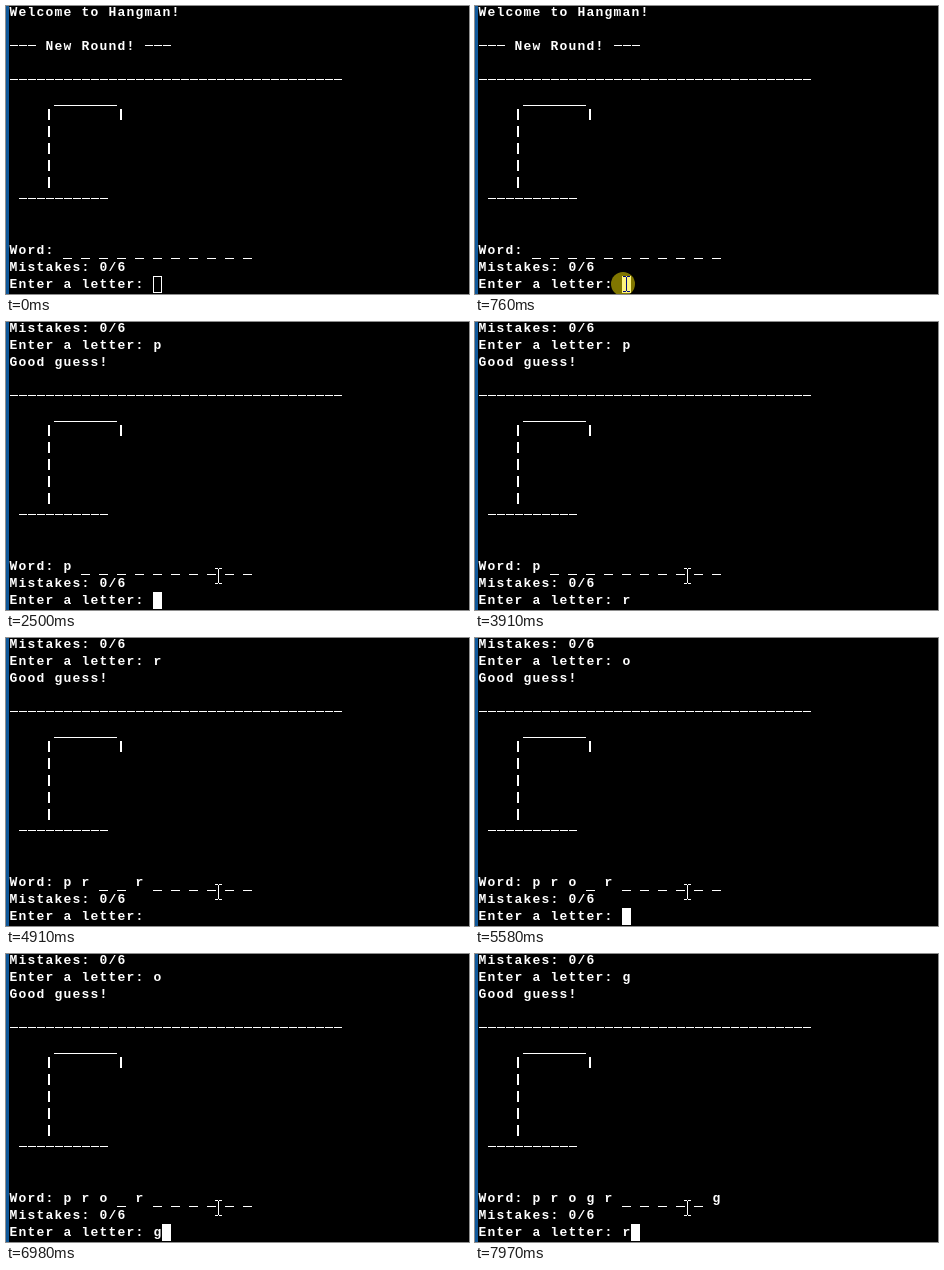
An HTML page that plays this animation: 463 px wide and 288 px high, repeating every 8000 ms.

```html
<!DOCTYPE html>
<html lang="en">
<head>
<meta charset="utf-8">
<title>Hangman</title>
<style>
  html, body { margin: 0; width: 100%; height: 100%; overflow: hidden; background: #000; }
  svg { display: block; width: 463px; height: 288px; isolation: isolate; }
  text { font: bold 13px "Liberation Mono", "DejaVu Sans Mono", monospace; letter-spacing: 1.2px; fill: #fff; }
  #pointer { mix-blend-mode: difference; }
</style>
</head>
<body>
<svg viewBox="0 0 463 288">
  <rect width="463" height="288" fill="#000"/>
  <rect width="3" height="288" fill="#10589a"/>
  <g id="screen" fill="#fff" shape-rendering="crispEdges"></g>
  <rect id="caret" y="270" width="9" height="17" fill="#fff"/>
  <rect id="hollow" x="147.5" y="270.5" width="8" height="16" fill="none" stroke="#fff"/>
  <circle id="click" cx="148" cy="278" r="12" fill="#ffeb00" opacity=".5"/>
  <path id="pointer" fill="#fff" shape-rendering="crispEdges"
    d="M-3-8h3v1h1v-1h3v1h-3v14h3v1h-3v-1h-1v1h-3v-1h3v-14h-3z"/>
</svg>
<script>
const LOOP = 8000, COL = 9, ROW = 17, LEFT = 3, TOP = -2;
const WORD = 'programming';
const $ = id => document.getElementById(id);

// time, guessed letters, typed text, caret visible
const STATES = [
  [0, '', '', true], [1310, '', '', false], [1970, '', '', true],
  [2300, '', 'p', true],
  [2500, 'p', '', true], [3110, 'p', '', false],
  [3310, 'p', 'r', true], [3910, 'p', 'r', false],
  [4310, 'pr', '', true], [4910, 'pr', '', false], [4970, 'pr', 'o', true],
  [5580, 'pro', '', true], [6180, 'pro', '', false],
  [6310, 'pro', 'g', true], [6380, 'pro', 'gr', true], [6980, 'pro', 'g', true],
  [7440, 'prog', '', true], [7970, 'prog', 'r', true]
];

// pointer path: time, x, y
const PATH = [
  [130, 367, 250], [270, 262, 262], [410, 185, 274], [550, 152, 278],
  [690, 148, 278], [760, 151, 278], [830, 155, 276],
  [900, 180, 266], [970, 204, 257], [1040, 212, 254]
];
const STEP = 70, FOCUS = 690, RELEASE = 830;

// x, y, width, height inside a character cell
const GLYPHS = {
  '-': [1, 7, 8, 1],
  '_': [0, 16, 9, 1],
  '|': [3, 3, 2, 11]
};

function lines(guessed, typed) {
  const last = guessed.slice(-1);
  const head = last
    ? ['Mistakes: 0/6', 'Enter a letter: ' + last, 'Good guess!', '']
    : ['Welcome to Hangman!', '', '--- New Round! ---', ''];
  const shown = [...WORD].map(c => guessed.includes(c) ? c : '_').join(' ');
  return [
    ...head,
    '-'.repeat(37),
    '     _______',
    '    |       |',
    ...Array(4).fill('    |'),
    ' ' + '-'.repeat(10),
    '', '',
    'Word: ' + shown,
    'Mistakes: 0/6',
    'Enter a letter: ' + typed
  ];
}

function lineMarkup(line, row) {
  const y = TOP + row * ROW;
  let out = '';
  for (const { 0: run, index } of line.matchAll(/[-_|]|[^\s\-_|]+/g)) {
    const x = LEFT + index * COL, g = GLYPHS[run];
    out += g
      ? `<rect x="${x + g[0]}" y="${y + g[1]}" width="${g[2]}" height="${g[3]}"/>`
      : `<text x="${x + .6}" y="${y + 12}">${run}</text>`;
  }
  return out;
}

function pointerAt(t) {
  const time = PATH[0][0] + Math.floor((t - PATH[0][0]) / STEP) * STEP;
  const i = PATH.findIndex(p => p[0] > time);
  if (i < 0) return PATH[PATH.length - 1].slice(1);
  const [t0, x0, y0] = PATH[i - 1], [t1, x1, y1] = PATH[i];
  const k = (time - t0) / (t1 - t0);
  return [Math.round(x0 + (x1 - x0) * k), Math.round(y0 + (y1 - y0) * k)];
}

const show = (id, on) => $(id).setAttribute('visibility', on ? 'visible' : 'hidden');

let drawn = '';
function render(t) {
  const [, guessed, typed, caret] = STATES.findLast(s => s[0] <= t);
  const key = guessed + '/' + typed;
  if (key !== drawn) {
    drawn = key;
    $('screen').innerHTML = lines(guessed, typed).map(lineMarkup).join('');
  }
  $('caret').setAttribute('x', LEFT + (16 + typed.length) * COL);
  show('caret', caret && t >= FOCUS);
  show('hollow', t < FOCUS);
  show('click', t >= FOCUS && t < RELEASE);
  const moving = t >= PATH[0][0];
  show('pointer', moving);
  if (moving) $('pointer').setAttribute('transform', `translate(${pointerAt(t)})`);
}

const start = performance.now();
function tick() {
  render((performance.now() - start) % LOOP);
  requestAnimationFrame(tick);
}
tick();
</script>
</body>
</html>
```
